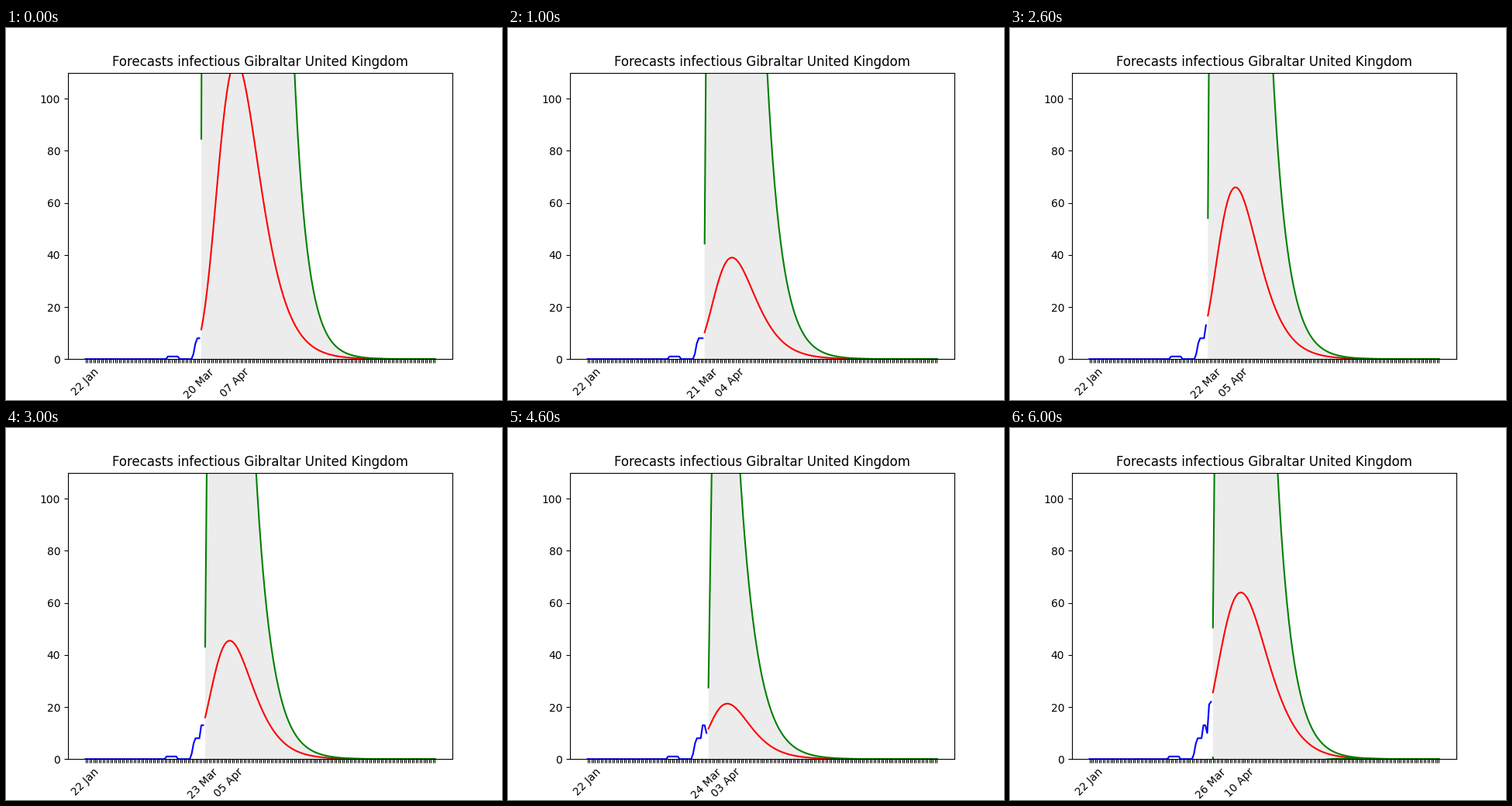
Write a matplotlib script that moves like this. It is 640 by 480 pixels and loops after 7 s.

```python
import numpy as np
import matplotlib.pyplot as plt
from matplotlib.animation import FuncAnimation

plt.rcParams["font.family"] = "DejaVu Sans"

HORIZON = 120      # forecast length in days
RECOVERY = 0.12    # recovery rate per day
TOP = 110          # upper limit of the y axis
FIRST_COUNT = 59   # observed days before the first forecast

OBSERVED = [0] * 42 + [1] * 6 + [0] * 7 + [2, 6, 8, 8, 8, 13, 13, 10, 21, 22]

# Peak value, days until the peak, days until the upper bound is back in view
KEY_POINTS = [
    (114.5, 18.7, 48.5),
    (39.0, 15.0, 33.1),
    (66.0, 15.2, 34.6),
    (45.5, 13.7, 27.4),
    (21.3, 10.8, 17.5),
    (45.7, 11.0, 24.0),
    (64.0, 15.7, 35.1),
]


def infectious(t, start, peak, peak_day):
    """Outbreak whose contact rate fades exponentially against recovery."""
    z = np.linspace(0.1, 3, 3000)
    ratio = 1 + np.log(peak / start) / (RECOVERY * peak_day)
    fade = np.interp(ratio, np.expm1(z) / z, z) / peak_day
    contact = RECOVERY * np.exp(fade * peak_day)
    return start * np.exp(contact / fade * (1 - np.exp(-fade * t)) - RECOVERY * t)


def forecast(i):
    """Mean and half width of the forecast band."""
    peak, peak_day, entry = KEY_POINTS[i]
    start = OBSERVED[FIRST_COUNT + i - 1]
    t = np.arange(1, HORIZON + 1)
    mean = infectious(t, start, peak, peak_day)

    # The band opens quickly, narrower with more data, then decays.
    opening = mean[0] / (0.155 + 0.145 * i) * (1 + 3 * (t - 1))
    gap = TOP - infectious(entry, start, peak, peak_day)
    closing = gap * np.exp(-(0.097 + 0.0012 * entry) * (t - entry))
    return mean, np.minimum(opening, closing)


def date_label(n):
    """Date n days after 22 January of a leap year."""
    day = 22 + n
    for month, length in (("Jan", 31), ("Feb", 29), ("Mar", 31), ("Apr", 30)):
        if day <= length:
            break
        day -= length
    return f"{day:02d} {month}"


fig, ax = plt.subplots(figsize=(6.4, 4.8), dpi=100)


def draw(i):
    ax.clear()
    count = FIRST_COUNT + i
    total = count + HORIZON
    days = np.arange(count, total)
    mean, spread = forecast(i)

    ax.fill_between(days, mean - spread, mean + spread,
                    color="gray", alpha=0.15, linewidth=0)
    ax.plot(np.arange(count), OBSERVED[:count], color="blue")
    ax.plot(days, mean, color="red")
    ax.plot(days, mean + spread, color="green")
    ax.plot(days, mean - spread, color="green")

    labels = [""] * total
    for n in (0, count - 1, count - 1 + np.argmax(mean)):
        labels[n] = date_label(n)
    ax.set_xticks(range(total), labels, rotation=45)
    margin = 0.05 * (total - 1)
    ax.set_xlim(-margin, total - 1 + margin)
    ax.set_ylim(0, TOP)
    ax.set_title("Forecasts infectious Gibraltar United Kingdom")
    return []


anim = FuncAnimation(fig, draw, frames=len(KEY_POINTS), interval=1000,
                     init_func=lambda: draw(0), repeat=True, repeat_delay=0)
plt.show()
```
